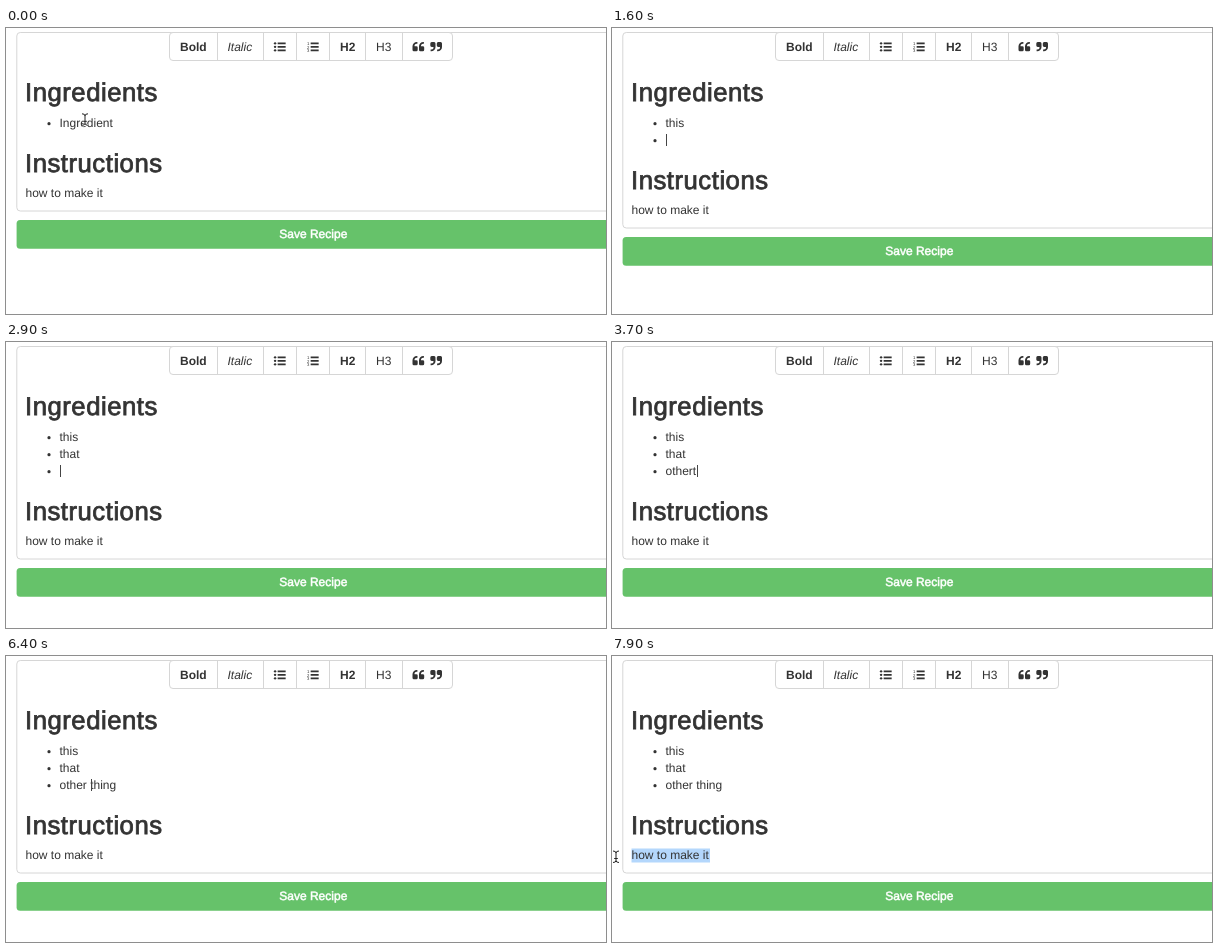
Write an HTML page that moves like this. It is 600 by 286 pixels and loops after 8000 ms.

```html
<!DOCTYPE html>
<html lang="en">
<head>
<meta charset="utf-8">
<title>Recipe editor</title>
<style>
  html, body { margin: 0; width: 100%; height: 100%; overflow: hidden; background: #fff; }
  svg { display: block; width: 600px; height: 286px; }
  text { font: 12px "Liberation Sans", Arial, sans-serif; fill: #333; white-space: pre; text-rendering: geometricPrecision; }
  .heading { font-size: 25.7px; letter-spacing: .52px; stroke: #333; stroke-width: .8px; }
  .bold { font-weight: bold; }
  .italic { font-style: italic; }
  .save { fill: #fff; stroke: #fff; stroke-width: .5px; text-anchor: middle; }
  .frame { fill: #fff; stroke: #d6d6d6; }
  .number { font-size: 4.6px; }
  .selection { fill: #b4d7fc; }
  .icon { fill: #333; }
</style>
</head>
<body>
<svg viewBox="0 0 600 286">
  <defs>
    <path id="bars" d="M4.3 1.3h8.7v1.7H4.3zM4.3 5.1h8.7v1.7H4.3zM4.3 8.9h8.7v1.7H4.3z"/>
    <path id="mark" d="M0 7.7V4.3A4.3 4.3 0 0 1 4.3 0H4.9V1.7H4.3A2.3 2.3 0 0 0 2 4.2H3.8Q5.2 4.2 5.2 5.6V7.7Q5.2 9.2 3.8 9.2H1.4Q0 9.2 0 7.7z"/>
    <g id="quote"><use href="#mark"/><use href="#mark" x="6.5"/></g>
    <path id="beam" d="M-3 -5.5Q0 -5.5 0 -3.5Q0 -5.5 3 -5.5M0 -4V4M-3 6Q0 6 0 4Q0 6 3 6M-1.8 2H1.8" fill="none"/>
  </defs>

  <rect id="editor" class="frame" x="10.8" y="4.5" width="610" height="178.5" rx="3.5"/>
  <g class="toolbar">
    <rect class="frame" x="163.5" y="4.5" width="283" height="28" rx="3.5"/>
    <path d="M211.5 5V32M257.5 5V32M290.5 5V32M323.5 5V32M359.5 5V32M396.5 5V32" stroke="#d6d6d6"/>
    <text class="bold" x="174" y="22.8">Bold</text>
    <text class="italic" x="221.5" y="22.8">Italic</text>
    <g class="icon" transform="translate(267.7 13.4) scale(.92)">
      <use href="#bars"/>
      <circle cx="1.5" cy="2.1" r="1.3"/><circle cx="1.5" cy="5.9" r="1.3"/><circle cx="1.5" cy="9.7" r="1.3"/>
    </g>
    <g class="icon" transform="translate(300.7 13.4) scale(.92)">
      <use href="#bars"/>
      <text class="number" x=".3" y="3.7">1</text><text class="number" x=".3" y="7.8">2</text><text class="number" x=".3" y="11.9">3</text>
    </g>
    <text class="bold" x="334" y="22.8">H2</text>
    <text x="370" y="22.8">H3</text>
    <use class="icon" href="#quote" x="406.5" y="14"/>
    <use class="icon" href="#quote" transform="translate(436 23.2) rotate(180)"/>
  </g>

  <text class="heading" x="19" y="73.2">Ingredients</text>
  <g id="list"></g>
  <g id="lower">
    <rect id="stepSelection" class="selection" y="158.5" height="14"/>
    <text class="heading" x="19" y="143.5">Instructions</text>
    <text x="19.5" y="169.2">how to make it</text>
    <rect x="10.6" y="192" width="610" height="28.7" rx="3.5" fill="#66c26a"/>
    <text class="save" x="307.3" y="210.2">Save Recipe</text>
  </g>
  <rect id="caret" width="1" height="12" fill="#444"/>
  <g id="pointer">
    <use href="#beam" stroke="#fff" stroke-width="2.4"/>
    <use href="#beam" stroke="#222"/>
  </g>
</svg>
<script>
const LOOP = 8000, ROW = 17, TEXT_X = 53.5, FIRST_BASELINE = 99;
const $ = id => document.getElementById(id);

// "/" separates list items, "|" is the caret, "*" marks the item as selected.
const edits = [
  [0, 'Ingredient'], [200, '*Ingredient'],
  [800, 't|'], [900, 'th|'], [1100, 'thi|'], [1200, 'this|'],
  [1600, 'this/|'], [2000, 'this/t|'], [2200, 'this/tah|'], [2400, 'this/t|'],
  [2500, 'this/tha|'], [2800, 'this/that|'], [2900, 'this/that/|'],
  [3200, 'this/that/o|'], [3300, 'this/that/ot|'], [3500, 'this/that/oth|'],
  [3600, 'this/that/othe|'], [3700, 'this/that/othert|'],
  [3900, 'this/that/otherth|'], [4000, 'this/that/otherthin|'],
  [4100, 'this/that/otherthing|'], [4500, 'this/that/otherthing'],
  [4800, 'this/that/otherthin|g'], [4900, 'this/that/otherthi|ng'],
  [5000, 'this/that/otherth|ing'], [5100, 'this/that/othert|hing'],
  [5400, 'this/that/other|thing'], [5800, 'this/that/other |thing'],
  [6000, 'this/that/other thing'], [6400, 'this/that/other |thing'],
  [6900, 'this/that/other thing'], [7300, 'this/that/other |thing'],
  [7500, 'this/that/other thing']
];
const pointerStops = [
  [0, 79, 91.3], [800], [6500, 83, 100], [6900, 76, 228], [7100, 84, 222],
  [7200, 102, 214], [7300, 115, 208], [7500, 112, 208], [7600, 104, 208],
  [7700, 91, 208], [7900, 4, 200.5]
];
const selections = [[0, 98], [7700, 93], [7900, 19.5]];

const at = (steps, time) => steps.findLast(step => step[0] <= time);

function add(parent, tag, attrs) {
  const node = document.createElementNS('http://www.w3.org/2000/svg', tag);
  for (const name in attrs) node.setAttribute(name, attrs[name]);
  return parent.appendChild(node);
}

const rows = [0, 1, 2].map(i => {
  const group = add($('list'), 'g', { transform: `translate(0 ${i * ROW})` });
  return {
    group,
    selection: add(group, 'rect', { class: 'selection', x: TEXT_X, y: 88.5, width: 53.2, height: 14 }),
    bullet: add(group, 'circle', { class: 'icon', cx: 43, cy: 95.7, r: 1.6 }),
    text: add(group, 'text', { x: TEXT_X, y: FIRST_BASELINE })
  };
});

const show = (node, visible) => node.setAttribute('visibility', visible ? 'visible' : 'hidden');

function drawList(content) {
  const items = content.split('/');
  show($('caret'), content.includes('|'));
  rows.forEach((row, i) => {
    const item = items[i] ?? '';
    const caretIndex = item.indexOf('|');
    row.text.textContent = item.replace(/[|*]/g, '');
    show(row.bullet, i < items.length);
    show(row.selection, item.startsWith('*'));
    if (caretIndex < 0) return;
    const offset = caretIndex ? row.text.getSubStringLength(0, caretIndex) : 0;
    $('caret').setAttribute('x', Math.round(TEXT_X + .5 + offset));
    $('caret').setAttribute('y', FIRST_BASELINE - 10 + i * ROW);
  });
  const growth = (items.length - 1) * ROW;
  $('lower').setAttribute('transform', `translate(0 ${growth})`);
  $('editor').setAttribute('height', 178.5 + growth);
}

function draw(now) {
  const time = now % LOOP;
  drawList(at(edits, time)[1]);

  const [, x, y] = at(pointerStops, time);
  show($('pointer'), x !== undefined);
  if (x !== undefined) $('pointer').setAttribute('transform', `translate(${x} ${y})`);

  const left = at(selections, time)[1];
  $('stepSelection').setAttribute('x', left);
  $('stepSelection').setAttribute('width', 98 - left);
}

const start = performance.now();
function tick() {
  draw(performance.now() - start);
  requestAnimationFrame(tick);
}
tick();
</script>
</body>
</html>
```
